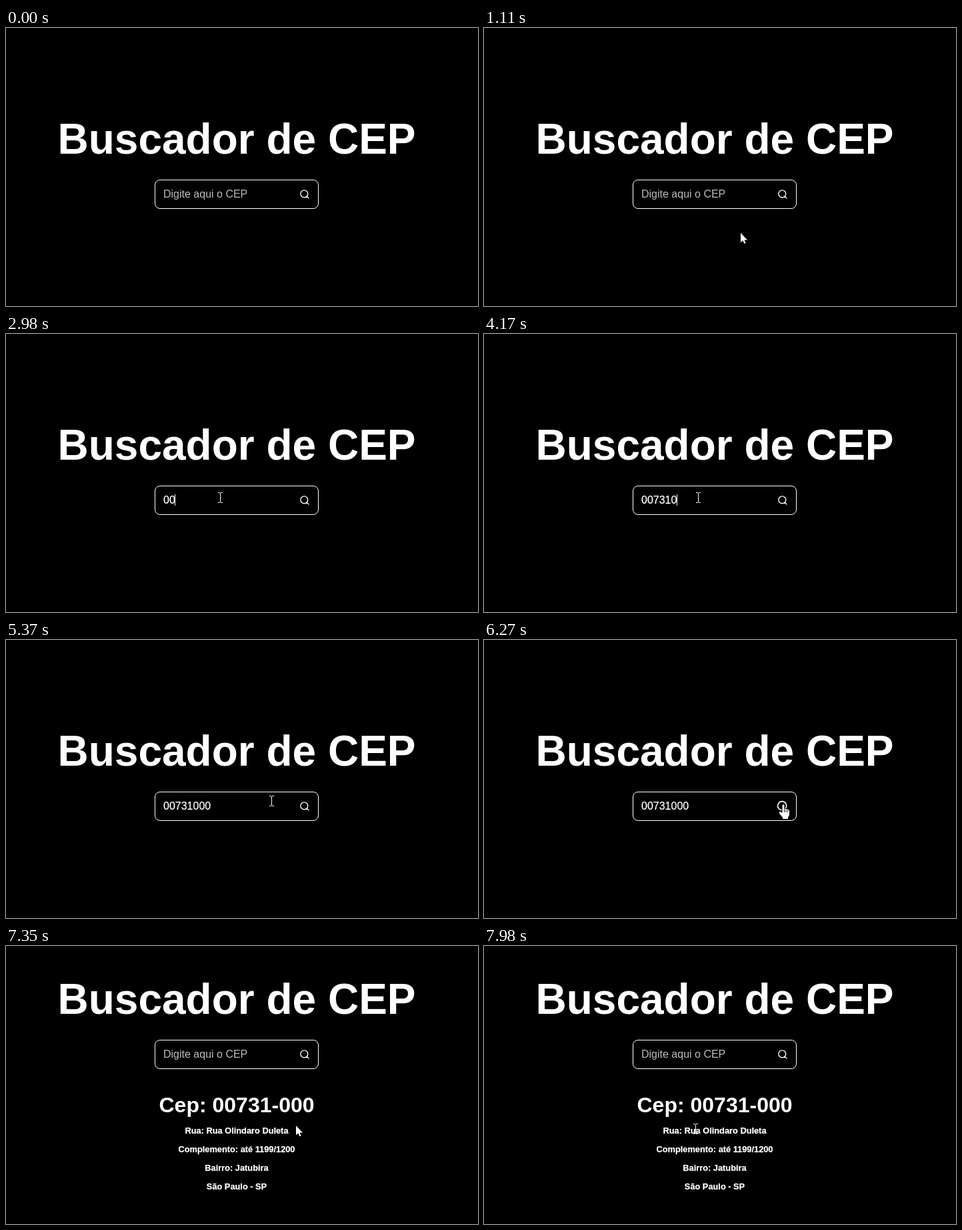
An HTML page with a canvas that plays this animation: 708 by 418 pixels, repeating every 8 s.

```html
<!DOCTYPE html>
<html lang="pt-BR">
<head>
<meta charset="utf-8">
<title>Buscador de CEP</title>
<style>
  html, body { margin: 0; width: 100%; height: 100%; overflow: hidden; background: #000; }
  canvas { display: block; }
</style>
</head>
<body>
<canvas id="stage" width="708" height="418"></canvas>
<script>
// An opaque canvas allows subpixel text smoothing.
const ctx = document.getElementById('stage').getContext('2d', { alpha: false });

const LOOP = 8000;
const STEP = 67;
const CENTER = 346;
const FOUND = 6400;
const FAMILY = '"Liberation Sans", Arial, sans-serif';

const CODE = '00731000';
const KEY_TIMES = [2840, 2980, 3450, 3580, 3710, 4170, 4370, 4570];
const CARET_ON = [[1650, 2250], [2710, 5100], [5600, 6200]];
const CLICKS = [[1650, 1850], [6200, 6270]];
const RESULT = [
  'Rua: Rua Olindaro Duleta',
  'Complemento: até 1199/1200',
  'Bairro: Jatubira',
  'São Paulo - SP'
];

// time, x, y of the pointer's hot spot
const POINTER = [
  [540, 599, 398], [600, 510, 364], [740, 416, 339], [973, 416, 339],
  [1380, 321, 246], [5100, 321, 246], [5370, 398, 242], [5600, 437, 244],
  [5860, 448, 246], [5930, 449, 247], [7000, 449, 247], [7270, 446, 264],
  [7560, 400, 289], [7840, 345, 280], [7980, 317, 275]
];

const ARROW = new Path2D('M0 0V14.5L3.3 11.5 5.5 16.3 7.6 15.3 5.5 10.7H10Z');
const HAND = new Path2D('M5.5 13V1.8Q5.5.3 7 .3T8.5 1.8V7Q9.8 6 11 7.3 12.4 6.6 13.5 8.2 16 7.8 16 10V16' +
  'L14 20V22H6V20L1.3 14Q.4 12 1.4 11.3T3.6 11.8Z');
const HAND_LINES = new Path2D('M8.5 7V12M11 8V12M13.5 9V12');

const clamp = v => Math.min(1, Math.max(0, v));
const within = (t, spans) => spans.some(([a, b]) => t >= a && t < b);
const inBox = (x, y, left, top, right, bottom) => x >= left && x < right && y >= top && y < bottom;

function text(str, x, y, size, { bold = true, align = 'center', color = '#fff', weight = 0 } = {}) {
  ctx.font = `${bold ? 'bold ' : ''}${size}px ${FAMILY}`;
  ctx.textAlign = align;
  ctx.fillStyle = color;
  ctx.fillText(str, x, y);
  if (weight) {
    ctx.lineWidth = weight;
    ctx.strokeStyle = color;
    ctx.strokeText(str, x, y);
  }
}

function pointerAt(t) {
  if (t < POINTER[0][0]) return null;
  const i = POINTER.findLastIndex(key => t >= key[0]);
  const [t0, x0, y0] = POINTER[i];
  const [t1, x1, y1] = POINTER[i + 1] || [LOOP, x0, y0];
  const held = Math.floor((t - t0) / STEP) * STEP;
  const p = clamp(held / (t1 - t0));
  return { x: Math.round(x0 + (x1 - x0) * p), y: Math.round(y0 + (y1 - y0) * p) };
}

function pointerKind(t, x, y) {
  if (t < FOUND) {
    if (!inBox(x, y, 223, 228, 469, 272)) return 'arrow';
    return x >= 440 ? 'hand' : 'beam';
  }
  const overText = inBox(x, y, 230, 220, 463, 258) ||
    inBox(x, y, 268, 269, 425, 285) || inBox(x, y, 258, 297, 435, 313);
  return overText ? 'beam' : 'arrow';
}

function drawBeam(x, y) {
  ctx.globalCompositeOperation = 'difference';
  ctx.fillStyle = '#fff';
  for (const top of [y - 8, y + 7]) {
    ctx.fillRect(x - 3, top, 3, 1);
    ctx.fillRect(x + 1, top, 3, 1);
  }
  ctx.fillRect(x, y - 7, 1, 14);
}

function drawShape(path, x, y, lines) {
  ctx.translate(x, y);
  ctx.lineJoin = 'round';
  ctx.lineWidth = 2;
  ctx.strokeStyle = '#000';
  ctx.stroke(path);
  ctx.fillStyle = '#fff';
  ctx.fill(path);
  ctx.lineWidth = 0.9;
  if (lines) ctx.stroke(lines);
}

function drawPointer(t) {
  const pos = pointerAt(t);
  if (!pos) return;
  const { x, y } = pos;
  const kind = pointerKind(t, x, y);
  ctx.save();
  if (kind === 'beam') drawBeam(x, y);
  else if (kind === 'hand') drawShape(HAND, x - 7, y, HAND_LINES);
  else drawShape(ARROW, x, y);
  ctx.restore();
  if (within(t, CLICKS)) {
    ctx.fillStyle = 'rgba(255, 255, 0, 0.47)';
    ctx.beginPath();
    ctx.arc(x - 2, y - 1, 12, 0, Math.PI * 2);
    ctx.fill();
  }
}

function drawIcon(t, cy) {
  const hover = clamp((t - 5730) / 200) - clamp((t - FOUND) / 200);
  const scale = 0.68 * (1 + 0.2 * hover);
  ctx.save();
  ctx.translate(448, cy);
  ctx.scale(scale, scale);
  ctx.strokeStyle = '#fff';
  ctx.lineWidth = 2;
  ctx.lineCap = 'round';
  ctx.beginPath();
  ctx.arc(-1, -1, 8, 0, Math.PI * 2);
  ctx.moveTo(9, 9);
  ctx.lineTo(4.65, 4.65);
  ctx.stroke();
  ctx.restore();
}

function drawField(t, top) {
  ctx.strokeStyle = '#fff';
  ctx.lineWidth = 1;
  ctx.beginPath();
  ctx.roundRect(223.5, top + 0.5, 245, 43, 7.5);
  ctx.stroke();

  const typed = t < FOUND ? CODE.slice(0, KEY_TIMES.filter(k => t >= k).length) : '';
  const style = typed ? { color: '#fff', weight: 0.25 } : { color: '#bcbcbc' };
  text(typed || 'Digite aqui o CEP', 236, top + 27, 16, { bold: false, align: 'left', ...style });
  if (within(t, CARET_ON)) {
    ctx.fillStyle = '#fff';
    ctx.fillRect(Math.floor(236 + ctx.measureText(typed).width), top + 13, 1, 17);
  }
  drawIcon(t, top + 22);
}

function draw(t) {
  const found = t >= FOUND;
  const top = found ? 141 : 228;
  ctx.fillStyle = '#000';
  ctx.fillRect(0, 0, 708, 418);
  text('Buscador de CEP', CENTER, top - 39, 64);
  drawField(t, top);
  if (found) {
    text('Cep: ' + CODE.slice(0, 5) + '-' + CODE.slice(5), CENTER, 250, 32);
    RESULT.forEach((line, i) => text(line, CENTER, 282 + 28 * i, 12.8, { weight: 0.25 }));
  }
  drawPointer(t);
}

function frame() {
  draw(performance.now() % LOOP);
  requestAnimationFrame(frame);
}
frame();
</script>
</body>
</html>
```
